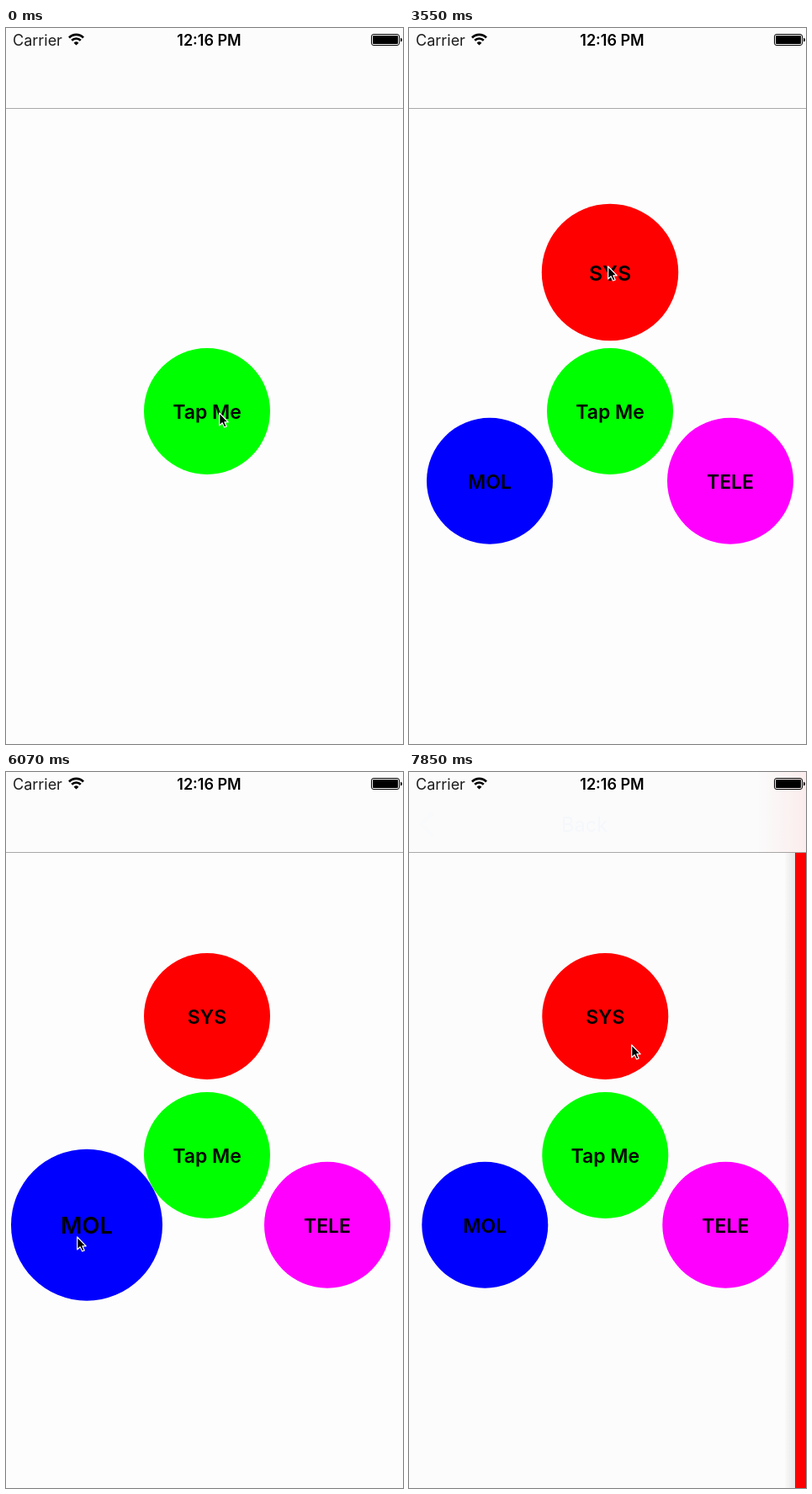
Recreate the animation shown at these times as an HTML page. Size 472 by 850 pixels, loop 8 s.

```html
<!DOCTYPE html>
<html lang="en">
<head>
<meta charset="utf-8">
<title>Radial menu</title>
<style>
  html, body { margin: 0; width: 100%; height: 100%; overflow: hidden; background: #fdfdfd; }
  svg { display: block; }
  text { font-family: Inter, Roboto, sans-serif; }
  .label { font-size: 23px; font-weight: 600; text-anchor: middle; }
</style>
</head>
<body>
<svg width="472" height="850" viewBox="0 0 472 850">
  <defs>
    <linearGradient id="tint" gradientUnits="userSpaceOnUse">
      <stop offset="0" stop-color="#f00" stop-opacity="0"/>
      <stop offset="1" stop-color="#f00"/>
    </linearGradient>
    <linearGradient id="edge">
      <stop offset="0" stop-opacity="0.01"/>
      <stop offset="1" stop-opacity="0.09"/>
    </linearGradient>
  </defs>

  <rect width="472" height="850" fill="#fdfdfd"/>
  <g id="menu"></g>
  <rect id="dim" width="472" height="850"/>
  <g id="page">
    <rect x="-12" width="12" height="850" fill="url(#edge)"/>
    <rect width="478" height="850" fill="#f00"/>
  </g>

  <rect width="472" height="96" fill="#fcfcfc"/>
  <rect id="barDim" width="472" height="96"/>
  <rect id="barTint" width="472" height="96" fill="url(#tint)"/>
  <rect y="95" width="472" height="1" opacity="0.33"/>
  <g id="nav">
    <path id="chevron" d="M28.5 48 L14 62 L28.5 76" fill="none" stroke="#007aff" stroke-width="4"/>
    <text id="back" y="70.5" font-size="23.6" fill="#007aff">Back</text>
    <text id="title" y="71" font-size="24.4" font-weight="600" text-anchor="middle"></text>
  </g>

  <text x="8" y="21" font-size="18" fill="#1c1c1c">Carrier</text>
  <g fill="none" stroke="#000" stroke-width="2.7">
    <path d="M75 11.5 A12 12 0 0 1 92 11.5"/>
    <path d="M78.2 14.7 A7.5 7.5 0 0 1 88.8 14.7"/>
    <path d="M83.5 20.6 L80.6 17.7 A4.1 4.1 0 0 1 86.4 17.7 Z" fill="#000" stroke="none"/>
  </g>
  <text x="241.5" y="21" font-size="18" font-weight="600" text-anchor="middle">12:16 PM</text>
  <rect x="434.5" y="7.5" width="33" height="13" rx="2.5" fill="none" stroke="#000"/>
  <rect x="436" y="9" width="30" height="10" rx="1"/>
  <path d="M469 11.5 q2 .5 2 2.5 t-2 2.5 Z"/>

  <path id="cursor" d="M.7 1 V16 L4.2 12.8 L6.6 18 L9.2 16.9 L6.9 11.8 H11.2 Z"
        stroke="#fff" stroke-width="1.2" stroke-linejoin="round"/>
</svg>
<script>
const LOOP = 8000, WIDTH = 478, CENTER = 239;
const $ = id => document.getElementById(id);
const clamp = v => Math.max(0, Math.min(1, v));
const set = (el, attrs) => { for (const k in attrs) el.setAttribute(k, attrs[k]); };

// Redraw times: runs of [first, last, count]
const runs = [[0, 0, 1], [600, 750, 2], [1050, 2050, 8], [2200, 3100, 7], [3250, 4280, 8],
  [4430, 5470, 8], [5620, 6660, 8], [6810, 7850, 8]];
const ticks = runs.flatMap(([a, b, n]) => Array.from({ length: n },
  (_, i) => Math.floor((a + (n > 1 ? (b - a) * i / (n - 1) : 0)) / 10) * 10));

// Pointer way points: time, x, y
const path = [
  [0, 253, 456], [600, 249, 455], [750, 245, 454], [2050, 245, 454], [2350, 194, 456],
  [2500, 119, 515], [2650, 160, 527], [2800, 298, 490], [2950, 280, 375], [3100, 236, 282],
  [4280, 236, 282], [4580, 130, 170], [4880, 43, 78], [5180, 43, 78], [5470, 62, 320],
  [5770, 84, 551], [6220, 84, 551], [6510, 183, 478], [6660, 190, 420], [6960, 110, 190],
  [7250, 43, 76], [7560, 43, 76], [7850, 264, 323]];

// Name, colour, resting place, moment of the press
const buttons = [
  ['SYS', '#f00', 239, 290, 3397],
  ['MOL', '#00f', 96, 537.7, 6060],
  ['TELE', '#f0f', 382, 537.7, -LOOP],
  ['Tap Me', '#0f0', 239, 455, 1195]
].map(([name, color, x, y, peak]) => {
  const g = document.createElementNS('http://www.w3.org/2000/svg', 'g');
  g.innerHTML = `<circle r="75" fill="${color}"/><text class="label" y="8.8">${name}</text>`;
  $('menu').append(g);
  return { g, x, y, peak, main: name === 'Tap Me' };
});

// Page slides: start, direction, title
const slides = [[3694, 'push', 'SYSTEM'], [5046, 'pop', 'SYSTEM'],
  [6369, 'push', 'MODEL'], [7575, 'pop', 'MODEL']];

const press = (t, peak) => 1 + 0.2 * Math.max(0, 1 - Math.abs(t - peak) / 245);
const spring = ms => { const u = ms * 0.01825; return (1 + u) * Math.exp(-u); };
const ease = p => p * p * (3 - 2 * p);

function pointer(t) {
  const i = path.findIndex(p => p[0] > t);
  if (i < 0) return path[path.length - 1].slice(1);
  const [a, b] = [path[i - 1], path[i]], k = (t - a[0]) / (b[0] - a[0]);
  return [a[1] + (b[1] - a[1]) * k, a[2] + (b[2] - a[2]) * k];
}

function drawNav(x, push, title) {
  const rest = 1 - x / WIDTH;
  const backShift = push ? Math.max(0, 0.365 * (x - 16)) : 0.0484 * x ** 1.298;
  const titleShift = push ? 0.2065 * x ** 1.244 : 0.565 * x;
  const still = x < 0.5;
  set($('back'), { x: 43 + backShift, opacity: still ? 1 : push ? 1 / (1 + x / 12) : 0.55 * rest });
  set($('chevron'), { opacity: still ? 1 : push ? 1 / (1 + x / 25) : 0.2 * rest });
  set($('title'), { x: CENTER + titleShift, opacity: clamp(1 - 0.0026 * x) });
  $('title').textContent = title;
  set($('tint'), { x1: x - 45, x2: x + 45 });
  set($('barTint'), { opacity: push ? 0.26 : 0.26 - 0.00037 * x });
}

function draw(t) {
  const slide = slides.filter(s => s[0] <= t).pop();
  const push = !!slide && slide[1] === 'push';
  const left = slide ? spring(t - slide[0]) : 0;
  const x = !slide ? WIDTH : WIDTH * (push ? left : 1 - left);
  const shown = x < 477;
  const cover = shown ? 1 - x / WIDTH : 0;

  for (const id of ['page', 'nav', 'barTint']) set($(id), { display: shown ? 'inline' : 'none' });
  set($('page'), { transform: `translate(${Math.round(x)} 0)` });
  set($('dim'), { opacity: 0.1 * cover });
  set($('barDim'), { opacity: 0.06 * cover });
  set($('menu'), { transform: `translate(${-0.3 * WIDTH * cover} 0)` });
  if (shown) drawNav(x, push, slide[2]);

  const open = ease(clamp((t - 1400) / 600));
  for (const b of buttons) {
    const k = b.main ? 1 : open;
    const bx = CENTER + (b.x - CENTER) * k, by = 455 + (b.y - 455) * k;
    set(b.g, {
      display: k ? 'inline' : 'none',
      transform: `translate(${bx} ${by}) scale(${press(t, b.peak)})`
    });
  }
  const [cx, cy] = pointer(t).map(Math.round);
  set($('cursor'), { transform: `translate(${cx} ${cy})` });
}

const start = performance.now();
function frame() {
  const t = (performance.now() - start) % LOOP;
  draw(ticks.filter(v => v <= t).pop() || 0);
  requestAnimationFrame(frame);
}
frame();
</script>
</body>
</html>
```
